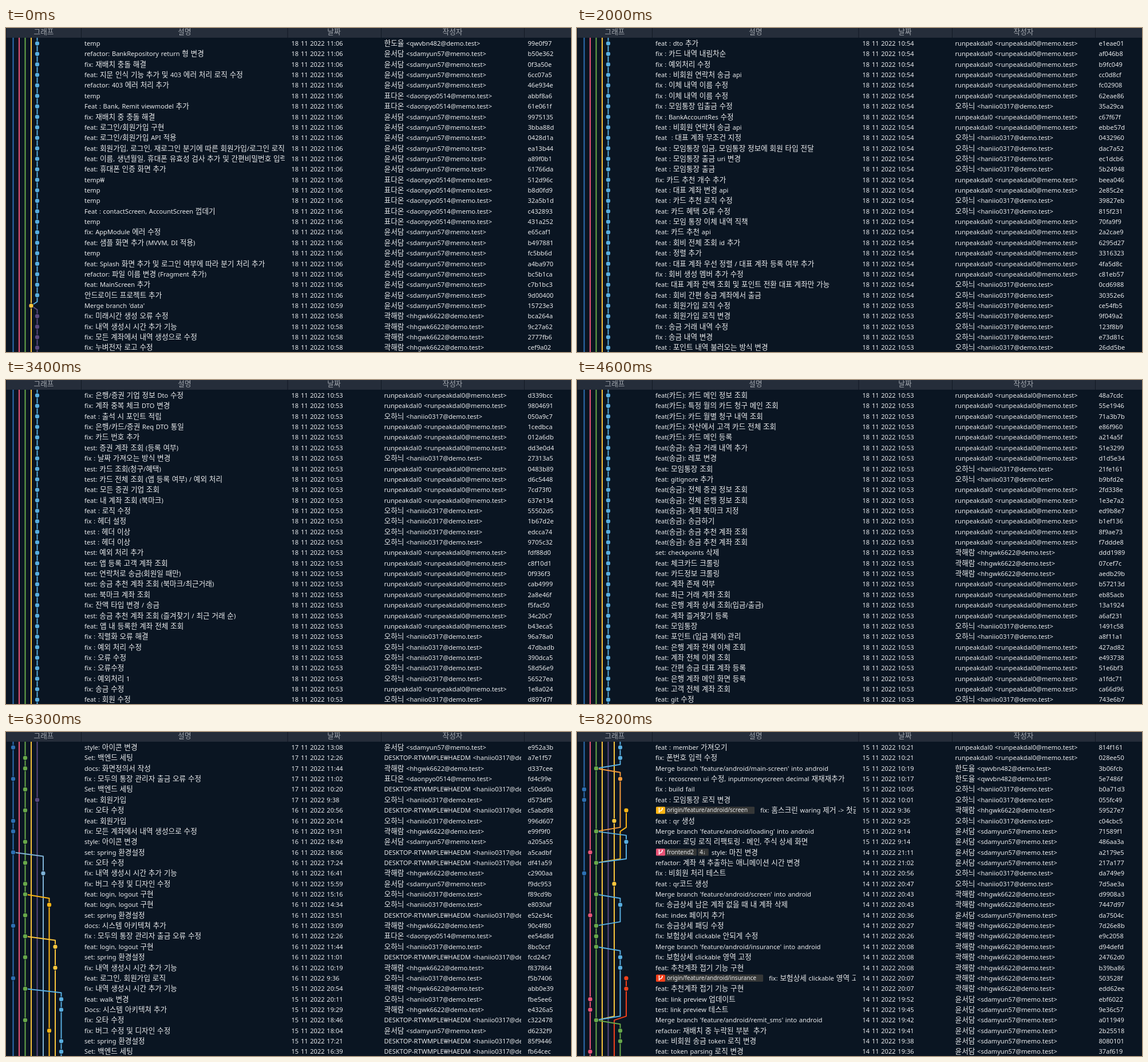
Animation of 987 by 567 pixels, one loop 8.8 s. Source, as an HTML page:

```html
<!DOCTYPE html>
<html lang="ko">
<head>
<meta charset="utf-8">
<style>
html, body { margin: 0; width: 100%; height: 100%; overflow: hidden; background: #0a1522; }
svg { display: block; overflow: hidden; }
text { font: 11.1px "Noto Sans", "Open Sans", sans-serif; fill: #eaecee; white-space: pre; word-spacing: .8px; }
.ko { font: 12.65px "Noto Sans CJK KR", "Noto Sans KR", sans-serif; }
.tag { font-size: 10.06px; }
.head { fill: #a3a8af; text-anchor: middle; }
</style>
</head>
<body>
<svg id="stage" width="987" height="567" viewBox="0 0 987 567"></svg>
<script>
const LOOP = 8800, PITCH = 18.36, TOP = 27, ROWS_PER_STEP = 6, FIRST_STEP = 500, BACK = '#0a1522';
// Gaps between scroll steps, in tenths of a second
const GAPS = '1212121' + '1' + '1212111' + '2' + '21222' + '2' + '212212' + '1' + '121212' + '2' + '212212' + '2' + '2112112';

const COLORS = {
  b: '#2d70b3', p: '#ea5478', g: '#68a94a', y: '#fbc63c', c: '#58aee0',
  v: '#59497f', l: '#7fb2d6', o: '#fcb514', a: '#f79c3c', r: '#f2401b'
};
const AUTHORS = {
  J: '한도율 <qwvbn482@demo.test>', L: '윤서담 <sdamyun57@memo.test>',
  C: '표다온 <daonpyo0514@memo.test>', M: '곽해람 <hhgwk6622@demo.test>',
  G: 'runpeakdal0 <runpeakdal0@memo.test>', N: '오하늬 <haniio0317@demo.test>',
  D: 'DESKTOP-RTWMPLE₩HAEDM <haniio0317@demo.test>'
};
// colour+lane, start row (<lane it leaves), end row (>lane it joins)
const BRANCHES = `b0 -1 340,p1 -1 340,g2 -1 340,y3 -1 340,c4 -1 25>3,v4 25<3 49>3,c4 50<3 214>3,v4 221 340,
c5 229<2 231>2,l5 244<0 270>0,o6 248<2 269>2,o6 266<2 269>2,y7 252<2 269>6,y6 269 270>5,y5 270 271>2,c8 257<2 266>2,
c5 273<2 279>2,p5 279<2 282>2,c5 283<2 285>2,o5 285<2 290>2,y6 289 290>5,y5 290 332>2,c6 290<2 293>2,c6 293<2 308>2,
a6 308<2 314>2,o7 312 314>6,o6 314 317>2,c7 314<2 317>2,c6 320<2 323>2,c6 325<2 332>2,r7 328 332>5,r5 332 340,g6 332<2 340`;

// hash, author+lane, [day] [time], [tag], message; "~" lines are generated rows, one lane digit each
const LOG = `99e0f97 J4 18 11:06 temp
b50e362 L4 refactor: BankRepository return 형 변경
0f3a50e L4 fix: 재배치 충돌 해결
6cc07a5 L4 feat: 지문 인식 기능 추가 및 403 에러 처리 로직 수정
46e934e L4 refactor: 403 에러 처리 추가
abbf8a6 C4 temp
61e061f C4 Feat : Bank, Remit viewmodel 추가
9975135 L4 fix: 재배치 중 충돌 해결
3bba88d L4 feat: 로그인/회원가입 구현
0428d1a L4 feat: 로그인/회원가입 API 적용
ea13b44 L4 feat: 회원가입, 로그인, 재로그인 분기에 따른 회원가입/로그인 로직
a89f0b1 L4 feat: 이름, 생년월일, 휴대폰 유효성 검사 추가 및 간편비밀번호 입력
61766da L4 feat: 휴대폰 인증 화면 추가
512d96c C4 temp₩
b8d0fd9 C4 temp
32a5b1d C4 temp
c432893 C4 Feat : contactScreen, AccountScreen 껍데기
431a252 C4 temp
e65caf1 L4 fix: AppModule 에러 수정
b497881 L4 feat: 샘플 화면 추가 (MVVM, DI 적용)
fc5bb6d L4 temp
a4ba970 L4 feat: Splash 화면 추가 및 로그인 여부에 따라 분기 처리 추가
bc5b1ca L4 refactor: 파일 이름 변경 (Fragment 추가)
c7b1bc3 L4 feat: MainScreen 추가
9d00400 L4 안드로이드 프로젝트 추가
15723e3 L3 10:59 Merge branch 'data'
bca264a M4 10:58 fix: 미래시간 생성 오류 수정
9c27a62 M4 fix: 내역 생성시 시간 추가 기능
2777fb6 M4 fix: 모든 계좌에서 내역 생성으로 수정
cef9a02 M4 fix: 누벼전자 로고 수정
~${'4'.repeat(19)}33${'4'.repeat(21)}
e1eae01 G4 10:54 feat : dto 추가
af046b8 G4 fix : 카드 내역 내림차순
b9fc049 G4 fix : 예외처리 수정
cc0d8cf G4 feat : 비회원 연락처 송금 api
fc02908 G4 fix : 이체 내역 이름 수정
62eae86 G4 fix : 이체 내역 이름 수정
35a29ca N4 fix : 모임통장 입출금 수정
c67f67f G4 fix : BankAccountRes 수정
ebbe57d G4 feat : 비회원 연락처 송금 api
0432960 N4 feat  : 대표 계좌 무조건 지정
dac7a52 N4 feat : 모임통장 입금, 모임통장 정보에 회원 타입 전달
ec1dcb6 N4 feat : 모임통장 출금 uri 변경
5b24948 N4 feat : 모임통장 출금
beea046 G4 fix: 카드 추천 개수 추가
2e85c2e G4 feat : 대표 계좌 변경 api
39827eb N4 feat : 카드 추천 로직 수정
815f231 N4 feat: 카드 혜택 오류 수정
70fa9f9 G4 feat : 모임 통장 이체 내역 직책
2a2cae9 G4 feat: 카드 추천 api
6295d27 G4 feat : 회비 전체 조회 id 추가
3316323 G4 feat : 정렬 추가
4fa5d8c G4 feat : 대표 계좌 우선 정렬 / 대표 계좌 등록 여부 추가
c81eb57 G4 fix : 회비 생성 멤버 추가 수정
0cd6988 N4 feat: 대표 계좌 잔액 조회 및 포인트 전환 대표 계좌만 가능
30352e6 N4 feat : 회비 간편 송금 계좌에서 출금
ce54fb5 N4 10:53 feat : 회원가입 로직 수정
9f049a2 N4 feat : 회원가입 로직 변경
123f8b9 N4 fix : 송금 거래 내역 수정
e73d81c N4 fix : 송금 내역 변경
26dd5be N4 feat : 포인트 내역 불러오는 방식 변경
~${'4'.repeat(24)}
d339bcc G4 fix: 은행/증권 기업 정보 Dto 수정
9804691 G4 fix: 계좌 중복 체크 DTO 변경
050a9c7 N4 feat : 출석 시 포인트 적립
1cedbca G4 fix: 은행/카드/증권 Req DTO 통일
012a6db G4 fix: 카드 번호 추가
dd3e0d4 G4 test: 증권 계좌 조회 (등록 여부)
27313a5 N4 fix : 날짜 가져오는 방식 변경
0483b89 G4 test: 카드 조회(청구/혜택)
d6c5448 G4 test: 카드 전체 조회 (앱 등록 여부) / 예외 처리
7cd73f0 G4 feat: 모든 증권 기업 조회
637e134 G4 feat: 내 계좌 조회 (북마크)
55502d5 N4 feat : 로직 수정
1b67d2e N4 fix : 헤더 설정
edcca74 N4 test : 헤더 이상
9705c32 N4 test : 헤더 이상
fdf88d0 G4 test: 예외 처리 추가
c8f10d1 G4 test: 앱 등록 고객 계좌 조회
0f936f3 G4 test: 연락처로 송금(회원일 때만)
cab4999 G4 test: 송금 추천 계좌 조회 (북마크/최근거래)
2a8e46f G4 test: 북마크 계좌 조회
f5fac50 G4 fix: 잔액 타입 변경 / 송금
34c20c7 G4 test: 송금 추천 계좌 조회 (즐겨찾기 / 최근 거래 순)
b43eca5 G4 feat: 앱 내 등록한 계좌 전체 조회
96a78a0 N4 fix : 직렬화 오류 해결
47dbadb N4 fix : 예외 처리 수정
390dca5 N4 fix : 오류 수정
58d56e9 N4 fix : 오류수정
56527ea N4 fix : 예외처리 1
1e8a024 G4 fix: 송금 수정
d897d7f N4 feat : 회원 수정
~${'4'.repeat(12)}
48a7cdc G4 feat(카드): 카드 메인 정보 조회
55e1946 G4 feat(카드): 특정 월의 카드 청구 메인 조회
71a3b7b G4 feat(카드): 카드 월별 청구 내역 조회
e86f960 G4 feat(카드): 자산에서 고객 카드 전체 조회
a214a5f G4 feat(카드): 카드 메인 등록
51e3299 G4 feat(송금): 송금 거래 내역 추가
d1d5e34 G4 feat(송금): 레포 변경
21fe161 N4 feat: 모임통장 조회
b9bfd2e N4 feat: gitignore 추가
2fd338e G4 feat(송금): 전체 증권 정보 조회
1e3e7a2 G4 feat(송금): 전체 은행 정보 조회
ed9b8e7 G4 feat(송금): 계좌 북마크 지정
b1ef136 G4 feat(송금): 송금하기
8f9ae73 G4 feat(송금): 송금 추천 계좌 조회
f7ddde8 G4 feat(송금): 송금 추천 계좌 조회
ddd1989 M4 set: checkpoints 삭제
07cef7c M4 feat: 체크카드 크롤링
aedb29b M4 feat: 카드정보 크롤링
b57213d G4 feat: 계좌 존재 여부
eb85acb G4 feat: 최근 거래 계좌 조회
13a1924 G4 feat: 은행 계좌 상세 조회(입금/출금)
a6af231 G4 feat: 계좌 즐겨찾기 등록
1491c58 N4 feat: 모임통장
a8f11a1 N4 feat: 포인트 (입금 제외) 관리
427ad82 G4 feat: 은행 계좌 전체 이체 조회
e493738 G4 feat: 계좌 전체 이체 조회
51e6bf3 G4 feat: 간편 송금 대표 계좌 등록
a1fdc71 G4 feat: 은행 계좌 메인 화면 등록
ca66d96 G4 feat: 고객 전체 계좌 조회
743e6b7 N4 feat: git 수정
~${'4'.repeat(6)}
7918ad0 N4 feat: login, logout 구현
c22df5e N4 feat: 로그인, 회원가입 로직
f57f0bd N4 feat: 회원가입
a43e059 N4 feat: 회원가입
09c530d N4 feat: 회원가입
5fbe368 D4 feat: 설정 변경
c9d5d10 D4 set: spring 환경설정
26d6aa9 D4 fix: 오타 수정
2f26d3c D4 fix: 오타 수정
002eaef D4 Set: 백엔드 세팅
ea353e5 M3 10:23 Docs: 시스템 아키텍쳐 추가
4403b32 M3 10:22 Docs:  시스템 아키텍처 삭제
8dd6c62 M3 10:12 docs: 시스템 아키텍쳐 추가
302bad3 N0 17 19:50 fix: user pf id 제대로 전송
bd6ad98 L2 19:34 feat: 자산 총액 화면 추가
c1a9c51 L2 17:57 [origin/feature/android/main-screen] fix: 계좌로 송금 시, 비회원
4f10c53 L2 feat: 모두의 통장 회비 내역에서 대상자 보는 기능 추가
7722e8d M4 17:56 [origin/data] fix: 미래시간 생성 오류 수정
c6c53dc M4 17:31 fix: 내역 생성시 시간 추가 기능
4b7a69a N0 17:28 fix : public 요청에 detail도 적재
137b842 M4 17:24 fix: 모든 계좌에서 내역 생성으로 수정
4b54be0 N0 17:13 feat : Due 로직 변경
29a6995 M3 16:56 docs: 화면정의서 작성
69d9605 N0 15:44 feat: walk 변경
0bc368c L2 14:31 style: 아이콘 변경
6ae2eef C2 14:23 Merge branch 'feature/android/groupAccount' into android
884758b C5 [origin/feature/android/groupAccount] fix : 출금시 text 오류 수정
90107dd C2 14:13 fix : 모두의 통장 관리자 출금 오류 수정
ed502f8 N0 14:03 feat : 모임통장 비회원 처리
5aca879 L2 13:50 fix: 버그 수정 및 디자인 수정
~022024200202522620272702882688
77c7cdf C8 15 15:56 fix  : groupAccountInputMoneyScreen 오류 수정
d1e53fd C8 fix :  병합 오류 수정
a3d50aa N2 15:48 Merge branch 'feature/android/etc' into android
cc17f32 N6 포인트 수정
1b4b8ad N7 포인트 수정
1dc3bd4 L2 15:35 feat: 홈 화면 포인트 카드 컨테이터 추가
96edb54 N0 15:28 feat: 이스터 에그
caf5abd N2 15:22 feat : 주식 미니 네비게이션
528928f L2 14:00 refactor: 자산 추가화면 자산 목록 순서 변경
e6a385b L2 13:35 Merge branch 'feature/android/loading' into android
5282175 L5 refactor: 로딩 로직 리팩토링 - 자산 화면
bab0c55 L5 refactor: 상품 재갱신 방지
d18999c L5 feat: 메인화면에 백 핸들러 추가
6a5f38d N0 13:13 fix: 최근 거래 내역 로직 수정
4e10dda N0 13:09 feat : 최근 거래 순으로 정렬
6d0458e G2 12:59 Merge branch 'feature/android/groupAccountDues/api' into android
8d160b0 G5 fix : 시간 변경
8f6b2ec N0 12:49 feat: 최근 거래 내역 수정
7e477fa M2 12:48 fix: hoemscreen waring 수정 / 함수 첫 대문자
7f13b58 J2 12:38 Merge branch 'feature/android/main-screen' into android
00a8abe J5 chore : 문구 수정
6f36a60 N2 11:25 Merge branch 'feature/android/qrgenerate' into android
2daaf95 N5 11:24 feat: 포인트 출금 화면 수정
ef76fc3 N5 11:23 feat : qr 생성
2038044 N5 feat : qr코드 생성
fc58271 N6 11:22 [origin/feature/android/qrgenerate] feat: 포인트 출금 화면 수정
093e1ef J2 11:17 Merge branch 'feature/android/main-screen' into android
2e7f485 J6 11:16 style : life detail ui 변경
0f32813 J6 style : ui 수정 (padding)
9ef286f G2 11:09 Merge branch 'feature/android/groupAccountDues/api' into android
~660656066506
814f161 G6 10:21 feat : member 가져오기
028ee50 G6 fix: 폰번호 입력 수정
3b06fcb J2 10:19 Merge branch 'feature/android/main-screen' into android
5e7486f J6 10:17 fix : recoscreen ui 수정, inputmoneyscreen decimal 재재재추가
b0a71d3 N0 10:05 fix : build fail
055fc49 N0 10:01 feat : 모임통장 로직 변경
59527e7 M7 9:36 [origin/feature/android/screen] fix: 홈스크린 waring 제거 -> 첫글자
c04cbc5 N5 9:25 feat : qr 생성
71589f1 L2 9:14 Merge branch 'feature/android/loading' into android
486aa3a L7 refactor: 로딩 로직 리팩토링 - 메인, 주식 상세 화면
a2179e5 L1 14 21:11 [frontend2|4↓] style: 마진 변경
217a177 L2 21:02 refactor: 계좌 색 추출하는 애니메이션 시간 변경
da749e9 N0 20:56 fix : 비회원 처리 테스트
7d5ae3a N5 20:47 feat : qr코드 생성
d9908a3 M2 20:43 Merge branch 'feature/android/screen' into android
7447d97 M6 fix: 송금상세 남은 계좌 없을 때 내 계좌 삭제
da7504c L1 20:36 feat: index 페이지 추가
7d26e8b M2 20:27 fix: 송금상세 패딩 수정
e9c2058 M2 20:26 fix: 보험상세 clickable 안되게 수정
d94defd M2 20:08 Merge branch 'feature/android/insurance' into android
24762d0 M6 fix: 보험상세 clickable 영역 고정
b39ba86 M6 feat: 추천계좌 접기 기능 구현
503528f M7 20:07 [origin/feature/android/insurance] fix: 보험상세 clickable 영역 고정
edd62ee M7 feat: 추천계좌 접기 기능 구현
ebf6022 L1 19:52 feat: link preview 업데이트
9e36c57 L1 19:45 test: link preview 테스트
a011949 L2 19:42 Merge branch 'feature/android/remit_sms' into android
2b25518 L6 19:41 refactor: 재배치 중 누락된 부분  추가
8080101 L6 19:38 feat: 비회원 송금 token 로직 변경
37af619 L1 19:36 feat: token parsing 로직 변경`;

let seed = 41;
const random = () => (seed = seed * 16807 % 2147483647) / 2147483647;

// Working-day minutes (9:00 to 21:00), so generated times skip the nights
const toWork = (day, time) => {
  const [h, m] = time.split(':').map(Number);
  return day * 720 + h * 60 + m - 540;
};
const fromWork = work => {
  const m = work % 720 + 540;
  return [Math.floor(work / 720), Math.floor(m / 60) + ':' + String(m % 60).padStart(2, '0')];
};

function readLog() {
  const rows = [];
  let day, time;
  for (const line of LOG.split('\n')) {
    if (line[0] === '~') {
      const pool = rows.slice(-30).filter(r => !r.tag && !/^Merge/.test(r.message));
      for (const lane of line.slice(1)) {
        const { author, message } = pool[Math.floor(random() * pool.length)];
        const hash = Math.floor((1 + random()) * 0x8000000).toString(16).slice(-7);
        rows.push({ hash, author, lane: +lane, message });
      }
      continue;
    }
    const m = line.match(/^(\w{7}) (\w)(\d) (?:(\d\d) )?(?:(\d+:\d\d) )?(?:\[(.*?)\] )?(.*)$/);
    day = m[4] || day;
    time = m[5] || time;
    rows.push({ hash: m[1], author: m[2], lane: +m[3], day, time, tag: m[6], message: m[7] });
  }
  rows.forEach((row, i) => {
    if (row.time) return;
    const prev = rows[i - 1], step = rows.slice(i).findIndex(r => r.time), next = rows[i + step];
    const a = toWork(prev.day, prev.time), b = toWork(next.day, next.time);
    [row.day, row.time] = fromWork(Math.round(a + (b - a) / (step + 1)));
  });
  return rows;
}

const stage = document.getElementById('stage');
const laneX = lane => 12.5 + 10.5 * lane;
const rowY = row => TOP + PITCH * row;

function add(parent, name, attrs = {}) {
  const node = document.createElementNS('http://www.w3.org/2000/svg', name);
  for (const key in attrs) node.setAttribute(key, attrs[key]);
  return parent.appendChild(node);
}

function label(parent, x, y, string, cls = '') {
  const text = add(parent, 'text', { x, y, class: cls });
  for (const run of string.split(/([가-힣]+)/)) {
    if (run) add(text, 'tspan', /[가-힣]/.test(run) ? { class: 'ko' } : {}).textContent = run;
  }
  return text;
}

// A clipped column whose inner group scrolls
function column(x, width) {
  return add(add(stage, 'svg', { x, y: 0, width, height: 567, viewBox: `${x} 0 ${width} 567` }), 'g');
}

function drawTag(parent, y, tag, color) {
  add(parent, 'rect', { x: 138, y: y - 6.5, width: 16, height: 12.5, rx: 1.5, fill: color });
  add(parent, 'path', {
    d: `M143.5 ${y - 4}v8M149 ${y - 3.5}q0 4 -5 5M142.5 ${y - 4}h2M148 ${y - 3.5}h2`,
    stroke: '#fff', 'stroke-width': 1.5, fill: 'none'
  });
  const parts = tag.split('|');
  let x = 154;
  for (const part of parts) {
    const box = add(parent, 'rect', { x, y: y - 6.5, height: 12.5, rx: 1.5, fill: '#353737' });
    const text = label(parent, x + 3, y + 3.2, part, 'tag');
    const width = text.getComputedTextLength() + (parts.length > 1 ? 8 : 15);
    box.setAttribute('width', width);
    x += width + 2;
  }
  return x + (parts.length > 1 ? 3 : 8);
}

add(stage, 'rect', { width: 987, height: 567, fill: BACK });
const columns = [column(0, 131), column(131, 356), column(491, 164), column(655, 245), column(905, 82)];
const [graph, messages, dates, authors, hashes] = columns;

const branches = BRANCHES.split(',').map(spec => {
  const [, color, lane, from, out, to, into] = spec.trim().match(/^(\w)(\d) (-?\d+)(?:<(\d))? (\d+)(?:>(\d))?$/);
  return { color: COLORS[color], lane: +lane, from: +from, out, to: +to, into };
});
for (const { color, lane, from, out, to, into } of branches) {
  const x = laneX(lane), knee = 7;
  const start = out ? `M${laneX(out)} ${rowY(from)}L${x} ${rowY(from) + knee}` : `M${x} ${rowY(from)}`;
  const end = into ? `V${rowY(to) - knee}L${laneX(into)} ${rowY(to)}` : `V${rowY(to)}`;
  add(graph, 'path', { d: start + end, stroke: color, 'stroke-width': 2, fill: 'none', 'stroke-linejoin': 'round' });
}

readLog().forEach((row, i) => {
  const y = rowY(i), base = y + 4;
  const { color } = branches.findLast(b => b.lane === row.lane && b.from <= i && i <= b.to) || branches[2];
  add(graph, 'circle', { cx: laneX(row.lane), cy: y, r: 4.1, fill: color, stroke: BACK, 'stroke-width': 1 });
  const x = row.tag ? drawTag(messages, y, row.tag, color) : 137;
  label(messages, x, base, row.message);
  label(dates, 498.5, base, `${row.day} 11 2022 ${row.time}`);
  label(authors, 660.5, base, AUTHORS[row.author]);
  label(hashes, 911.5, base, row.hash);
});

add(stage, 'rect', { width: 987, height: 17, fill: '#252d3a' });
for (const x of [0, 131, 491.5, 655, 905]) add(stage, 'rect', { x, width: 1, height: 17, fill: '#121924' });
[['그래프', 66], ['설명', 312], ['날짜', 573], ['작성자', 780]].forEach(([name, x]) => label(stage, x, 11, name, 'head'));

const stepTimes = [FIRST_STEP];
for (const gap of GAPS) stepTimes.push(stepTimes.at(-1) + gap * 100);

function render(time) {
  const steps = stepTimes.filter(t => t <= time).length;
  const shift = -steps * ROWS_PER_STEP * PITCH;
  for (const group of columns) group.setAttribute('transform', `translate(0 ${shift})`);
}

const began = performance.now();
function tick() {
  render((performance.now() - began) % LOOP);
  requestAnimationFrame(tick);
}
tick();
</script>
</body>
</html>
```
